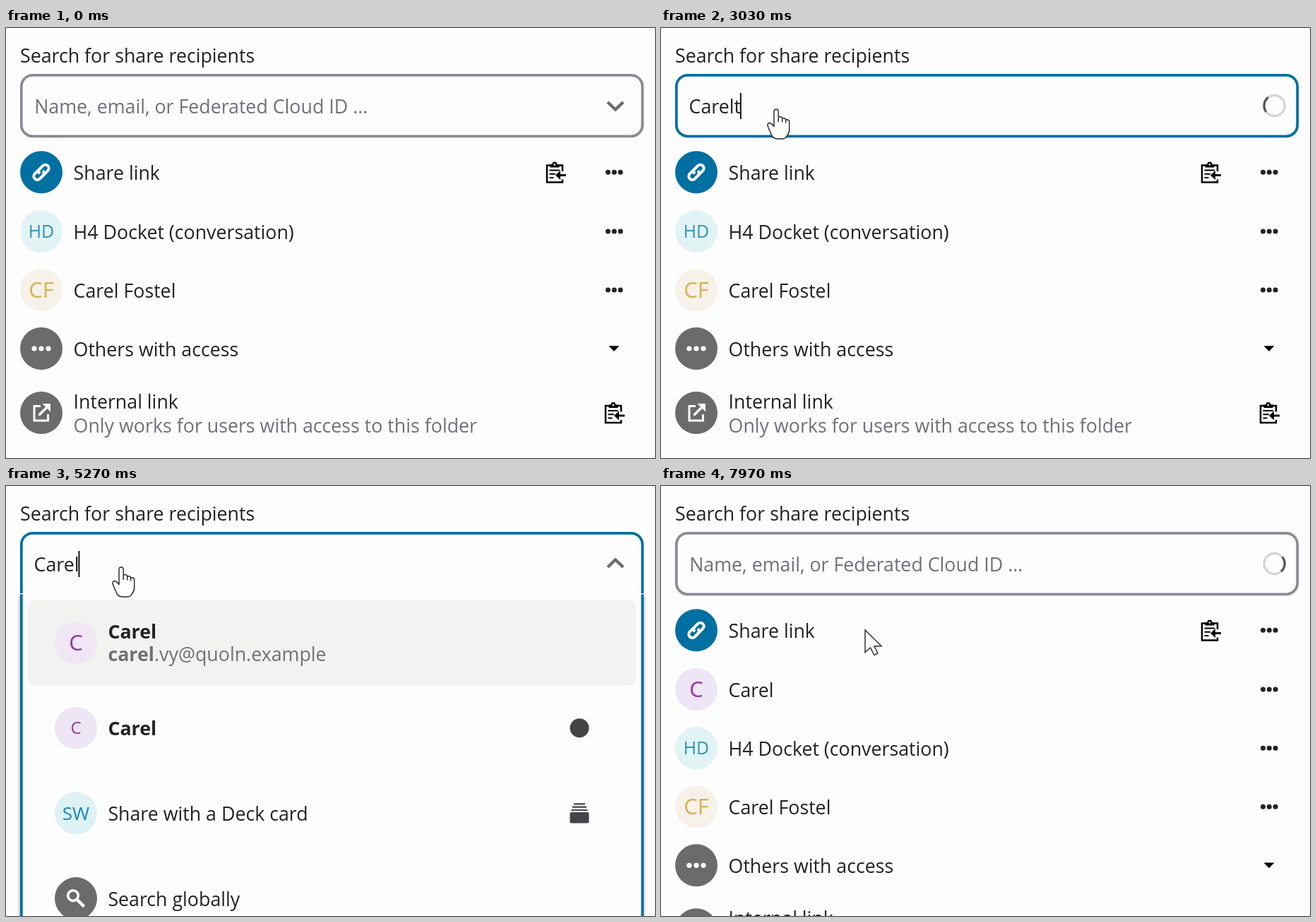
Recreate the animation shown at these times as an HTML page. Size 919 by 609 pixels, loop 8000 ms.

```html
<!DOCTYPE html>
<html lang="en">
<head>
<meta charset="utf-8">
<title>Share recipients</title>
<style>
  html, body { margin: 0; width: 100%; height: 100%; overflow: hidden; background: #fdfdfd; }
  svg { display: block; width: 100%; height: 100%; }
  text { font: 26.75px "Open Sans", "Noto Sans", sans-serif; fill: #222; white-space: pre; }
  .muted { fill: #70707a; }
  .bold { font-weight: 700; }
  .line { fill: none; stroke-linejoin: miter; }
</style>
</head>
<body>
<svg id="stage" viewBox="0 0 919 609" xmlns="http://www.w3.org/2000/svg"></svg>
<script>
const LOOP = 8000;
const BLUE = '#006fa1', GREY = '#6b6b6b', PAPER = '#fdfdfd', INK = '#222';
const NAME = 'Carel';

// Markup helpers
const text = (x, y, s, cls = '') => `<text x="${x}" y="${y}" class="${cls}">${s}</text>`;
const at = (x, y, body) => `<g transform="translate(${x} ${y})">${body}</g>`;
const line = (d, color, width, extra = '') =>
  `<path class="line" d="${d}" stroke="${color}" stroke-width="${width}" ${extra}/>`;
const disc = (fill, body = '') => `<circle r="30" fill="${fill}"/>${body}`;
const avatar = (s, fill, color, size) => disc(fill,
  `<text y="${size * 0.357}" text-anchor="middle" style="font-size:${size}px;fill:${color}">${s}</text>`);
const dots = (color, r, gap) =>
  [-gap, 0, gap].map(x => `<circle cx="${x}" r="${r}" fill="${color}"/>`).join('');

// Icons, centred on 0,0
const hook = 'M1.5 -5H-8a5 5 0 0 0 0 10H-2a5 5 0 0 0 5 -5';
const icon = {
  link: `<g transform="rotate(-45)">${line(hook, '#fff', 4)}
    ${line(hook, '#fff', 4, 'transform="rotate(180)"')}</g>`,
  clip: line('M10 -2V-10.5H-12V13.5H10V9.5', '#000', 2.5) +
    '<path d="M-7.5 -7.5V-12H-4.5a3.4 3.4 0 0 1 6.8 0H5.5V-7.5z"/>' +
    `<circle cx="-1.1" cy="-11.6" r="1.3" fill="${PAPER}"/>` +
    line('M-8.5 -3.5H6M-8.5 1.7H0M-8.5 7H-2.5', '#000', 2) +
    line('M15 3.5H4', '#000', 2.9) + '<path d="M0 3.5L7 -3V10z"/>',
  more: dots(INK, 3.5, 8.8),
  caret: '<path d="M-7.5 -3.8H7.5L0 4z"/>',
  open: line('M-1 -9.5H-10V11H9.5V2', '#fff', 3) +
    line('M-3.5 3.5L9 -9', '#fff', 3.4) + '<path d="M1.5 -13H13V-1.5z" fill="#fff"/>',
  find: `<circle cx="-4" cy="-4" r="7.3" fill="none" stroke="#fff" stroke-width="3.6"/>` +
    line('M1.5 1.5L11.5 11.5', '#fff', 4.4),
  deck: line('M-8 -13H8M-10 -8.7H10M-11.5 -4.4H11.5', '#44444a', 2.2) +
    '<rect x="-13.5" y="-1.5" width="27" height="15.5" rx="2" fill="#44444a"/>',
  talk: '<circle r="13.5" fill="#444"/>',
  moon: `<circle r="15" fill="${PAPER}"/>` +
    '<path d="M-6.5 -11A12.6 12.6 0 1 0 12.5 4.5A12.5 12.5 0 0 1 -6.5 -11z" fill="#eda035"/>'
};

const faces = {
  group: avatar('HD', '#e2f3f6', '#2d93b2', 24.8),
  friend: avatar('CF', '#f6f1e9', '#d8b054', 31),
  added: avatar('C', '#eee6f7', '#9a30ac', 31),
  picked: avatar('C', '#f1e6f4', '#8d3c9c', 31),
  chat: avatar('C', '#eee6f5', '#8d3c9c', 24),
  deck: avatar('SW', '#def2f5', '#1686bd', 26)
};

const row = (y, face, label, ...icons) => at(50, y, face) + text(95.6, y + 11, label) + icons.join('');
const more = y => at(861.3, y, icon.more);

// Dropdown entries, by centre line
const deckItem = y => at(99, y, faces.deck) + text(144.4, y + 10.5, 'Share with a Deck card') + at(812, y, icon.deck);
const findItem = y => at(99, y, disc(GREY, icon.find)) + text(144.4, y + 10.5, 'Search globally');
const personItem = y => at(99, y, faces.picked) + text(144.4, y - 6, NAME, 'bold') +
  text(144.4, y + 25.5, `<tspan class="bold">carel</tspan>.vy@quoln.example`, 'muted') +
  `<g id="moon">${at(121, y + 20, icon.moon)}</g>`;
const chatItem = y => at(99, y, faces.chat) + text(144.4, y + 10.5, NAME, 'bold') + at(812, y, icon.talk);

const menu = (id, bottom, items) => {
  const shape = `M21.8 152V${bottom - 18}a16 16 0 0 0 16 16H885.2a16 16 0 0 0 16 -16V152`;
  return `<g id="${id}">
    <path d="${shape}" fill="${PAPER}" stroke="${BLUE}" stroke-width="3.8" filter="url(#shadow)"/>
    <path d="M20 152.5h4M899 152.5h4" stroke="${PAPER}" stroke-width="1.4"/>
    <rect x="31" y="161" width="861" height="121" rx="10" fill="#f2f2f1"/>
    ${items.map((item, i) => item(222 + i * 120.7)).join('')}</g>`;
};

document.getElementById('stage').innerHTML = `
  <defs><filter id="shadow" x="-5%" y="-10%" width="110%" height="125%">
    <feDropShadow dx="0" dy="2.5" stdDeviation="2.5" flood-color="#444" flood-opacity=".5"/>
  </filter></defs>
  <rect width="919" height="609" fill="${PAPER}"/>
  ${text(20, 49, 'Search for share recipients')}
  ${row(204.3, disc(BLUE, icon.link), 'Share link', at(778, 205, icon.clip), more(204.3))}
  <g id="newRow">${row(288, faces.added, NAME, more(288))}</g>
  <g id="rows">
    ${row(288, faces.group, 'H4 Docket (conversation)', more(288))}
    ${row(371, faces.friend, 'Carel Fostel', more(371))}
    ${row(454, disc(GREY, dots('#fff', 3.6, 10)), 'Others with access', at(861, 454, icon.caret))}
    ${at(50, 545, disc(GREY, icon.open))}
    ${text(95.6, 539, 'Internal link')}
    ${text(95.6, 573, 'Only works for users with access to this folder', 'muted')}
    ${at(861, 545.5, icon.clip)}
  </g>
  <rect id="field" x="21.8" y="66.8" width="879.4" height="86.6" rx="16" fill="${PAPER}" stroke-width="3.8"/>
  ${menu('menu0', 293, [deckItem])}
  ${menu('menu1', 413, [deckItem, findItem])}
  ${menu('menu2', 680, [personItem, chatItem, deckItem, findItem])}
  <path id="openField" d="M21.8 152V82.8a16 16 0 0 1 16 -16H885.2a16 16 0 0 1 16 16V152" fill="${PAPER}" stroke="${BLUE}" stroke-width="3.8"/>
  <g id="hint">${text(40.2, 121, 'Name, email, or Federated Cloud ID …', 'muted')}</g>
  <text id="query" x="39.5" y="121"></text>
  <rect id="caret" y="92" width="2" height="37" fill="#111"/>
  <path id="chevron" class="line" d="M-11 -5L0 5.5L11 -5" stroke="${GREY}" stroke-width="4.4"/>
  <g id="spinner" fill="none" stroke-width="3.2">
    <circle r="14.6" stroke="#d3d3da"/>
    <path d="M-10.3 -10.3A14.6 14.6 0 0 0 -10.3 10.3" stroke="#54545e"/>
  </g>
  <g id="hand" fill="#fff" stroke="#2b2b33" stroke-width="1.5" stroke-linejoin="round">
    <path d="M-3 3.5q0 -3.5 3 -3.5q3.2 0 3.2 3.5V11q5 -1.5 5.5 2q4.6 -1 5 2q5 -1 5 3V29q0 5 -3 8q-2 5 -7.5 5h-6q-5 0 -8 -4L-11 26q-2.5 -5 1 -6.5q3 -.5 7 5z"/>
    <path d="M3.2 11V18M8.7 13V18.5M13.7 15V19.5" fill="none"/>
  </g>
  <path id="arrow" d="M0 0V31.5L7.5 25L13 35.5L18 33L13 22.8H23z" fill="#fff" stroke="#333" stroke-width="1.5"/>`;

const el = Object.fromEntries([...document.querySelectorAll('[id]')].map(e => [e.id, e]));

// Timeline (ms)
const keys = [2100, 2260, 2420, 2580, 2740, 2900];
const erase = 4800, pick = 6950, added = 7700, moonAt = 5950;
const menus = [[780, keys[0]], [3800, erase], [5120, pick]];
const loads = [[keys[0], 3800], [erase, 5120], [pick, LOOP]];

const clamp = v => Math.max(0, Math.min(1, v));
const smooth = (t, a, b) => { const p = clamp((t - a) / (b - a)); return p * p * (3 - 2 * p); };
const within = (t, [a, b]) => t >= a && t < b;
const show = (e, on) => e.style.display = on ? '' : 'none';
const place = (e, x, y, turn = 0) => e.setAttribute('transform', `translate(${x} ${y}) rotate(${turn})`);

function pointer(t) {
  const p = smooth(t, 150, 720), q = smooth(t, 6200, 6560);
  return [-25 + 188 * p + 126 * q, 300 - 185 * p + 89 * q * (0.8 + 0.2 * q)];
}

function queryAt(t) {
  if (t >= pick) return '';
  const count = keys.filter(k => t >= k).length;
  return (NAME + 't').slice(0, t >= erase ? NAME.length : count);
}

function draw(t) {
  const [x, y] = pointer(t);
  const isOpen = menus.some(m => within(t, m));
  const isLoading = loads.some(l => within(t, l));
  const hover = x > 20 && y > 65 && y < 155;
  const focused = t >= menus[0][0] && t < pick;

  el.field.setAttribute('stroke', isOpen ? 'none' : hover || focused ? BLUE : '#8b8a96');
  show(el.openField, isOpen);

  let turn = 0;
  menus.forEach(([a, b], i) => {
    const alpha = Math.min(clamp((t - a) / 100), 1 - clamp((t - b) / 100));
    show(el['menu' + i], alpha > 0);
    el['menu' + i].setAttribute('opacity', alpha);
    turn = Math.max(turn, 180 * alpha);
  });
  show(el.moon, t >= moonAt);

  const query = queryAt(t);
  el.query.textContent = query;
  show(el.hint, !query);
  const lastKey = Math.max(menus[0][0], ...[...keys, erase].filter(k => k <= t));
  show(el.caret, focused && (t - lastKey) % 1060 < 530);
  el.caret.setAttribute('x', 38.5 + (query ? el.query.getComputedTextLength() : 0));

  show(el.chevron, !isLoading);
  place(el.chevron, 863, 110, turn);
  show(el.spinner, isLoading);
  place(el.spinner, 868.6, 110, (t - 3030) / 1100 * 360 + 8);

  show(el.newRow, t >= added);
  place(el.rows, 0, t >= added ? 83.3 : 0);

  const pointing = hover || isOpen;
  show(el.hand, pointing);
  show(el.arrow, !pointing);
  place(el.hand, x, y);
  place(el.arrow, x, y);
}

let start;
function tick(now) {
  start ??= now;
  draw((now - start) % LOOP);
  requestAnimationFrame(tick);
}
draw(0);
requestAnimationFrame(tick);
</script>
</body>
</html>
```
